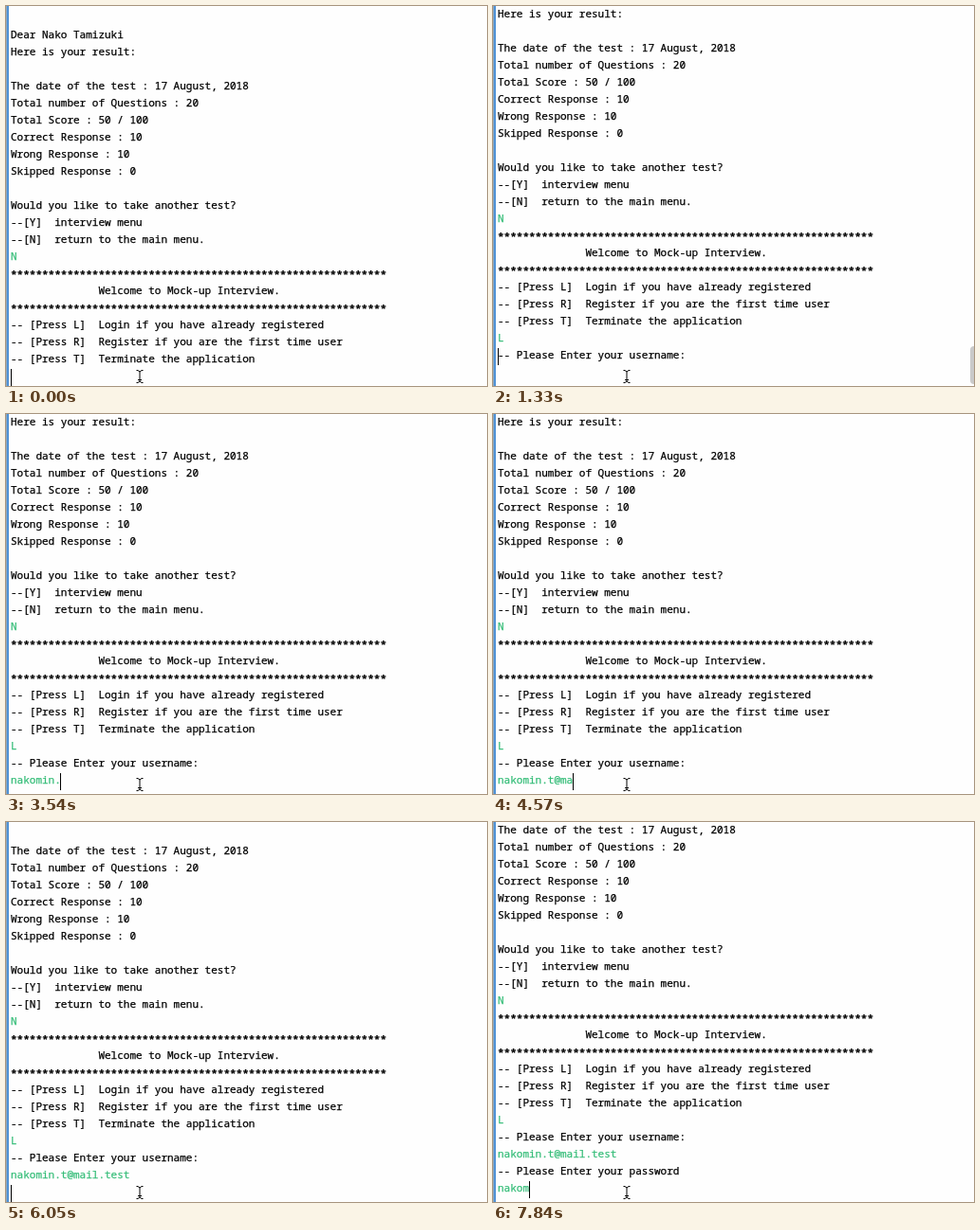
Animation, 507 px wide and 401 px high, one loop 8000 ms. Source, as an HTML page:

```html
<!DOCTYPE html>
<html lang="en">
<head>
<meta charset="utf-8">
<title>Console session</title>
<style>
  html, body { margin: 0; width: 100%; height: 100%; overflow: hidden; background: #fefefe; }
  #stage { position: relative; width: 507px; height: 401px; overflow: hidden; }
  #stage *:not(path) { position: absolute; }
  #view { left: 5px; top: 2px; width: 502px; height: 399px; overflow: hidden; }
  #console { left: 0; width: 502px; color: #000; -webkit-text-stroke: .25px;
    font: 11px/18px "Noto Sans Mono", "DejaVu Sans Mono", monospace; }
  #console div { left: 0; height: 18px; white-space: pre; }
  #console .input { color: #35bd78; }
  #console .stars { margin-top: 1px; font-weight: 700; }
  #console #caret { width: 1px; background: #000; }
  #edge { left: 0; top: 0; width: 3px; height: 401px;
    background: linear-gradient(90deg, #8fa9be 1px, #4f92d6 1px); }
  #thumb { left: 503px; top: 359px; width: 8px; height: 40px; border-radius: 4px; background: #cacaca; }
  #pointer { left: 133.5px; top: 380px; }
</style>
</head>
<body>
<div id="stage">
  <div id="view"><div id="console"><div id="caret"></div></div></div>
  <div id="edge"></div>
  <div id="thumb"></div>
  <svg id="pointer" width="14" height="22" fill="none" stroke="#000">
    <path d="M3.5 4.5h1.5l2 1.5l2-1.5h1.5M7 6v10M5 14.5h4M3.5 17.5h1.5l2-1.5l2 1.5h1.5"/>
  </svg>
</div>
<script>
const LOOP = 8000, ROW = 18, ADVANCE = 6.6;
const KEY = 148;     // time between keys, and from Enter to the next prompt
const BLINK = 590;   // the caret stays on this long after the last activity

const stars = '*'.repeat(60);
const output = [
  'Dear Nako Tamizuki',
  'Here is your result:',
  '',
  'The date of the test : 17 August, 2018',
  'Total number of Questions : 20',
  'Total Score : 50 / 100',
  'Correct Response : 10',
  'Wrong Response : 10',
  'Skipped Response : 0',
  '',
  'Would you like to take another test?',
  '--[Y]  interview menu',
  '--[N]  return to the main menu.',
  'N',
  stars,
  ' '.repeat(14) + 'Welcome to Mock-up Interview.',
  stars,
  '-- [Press L]  Login if you have already registered',
  '-- [Press R]  Register if you are the first time user',
  '-- [Press T]  Terminate the application'
];

// Each burst is [time of its first key, number of keys]
const turns = [
  { start: 0, answer: 'L', bursts: [[1040, 1]] },
  { start: 1180, prompt: '-- Please Enter your username:', answer: 'nakomin.t@mail.test',
    bursts: [[2360, 7], [3540, 1], [3830, 2], [4420, 9]] },
  { start: 6050, prompt: '-- Please Enter your password', answer: 'nakomin',
    bursts: [[7090, 3], [7690, 2]] }
];
for (const turn of turns) {
  turn.keys = turn.bursts.flatMap(([from, count]) =>
    Array.from({ length: count }, (_, i) => from + i * KEY));
}

const byId = id => document.getElementById(id);
const panel = byId('console'), caret = byId('caret'), thumb = byId('thumb');

function addRow(text, className = '') {
  const row = document.createElement('div');
  row.textContent = text;
  row.className = className;
  row.style.top = (panel.children.length - 1) * ROW + 'px';
  return panel.appendChild(row);
}

for (const text of output) {
  addRow(text, text === stars ? 'stars' : text === 'N' ? 'input' : '');
}
for (const turn of turns) {
  if (turn.prompt) turn.promptRow = addRow('');
  turn.answerRow = addRow('', 'input');
}

function render(t) {
  for (const turn of turns) {
    turn.typed = turn.keys.filter(key => key <= t).length;
    turn.answerRow.textContent = turn.answer.slice(0, turn.typed);
    if (turn.prompt) turn.promptRow.textContent = t >= turn.start + KEY ? turn.prompt : '';
  }

  const index = turns.findLastIndex(turn => turn.start <= t);
  const { start, prompt, answer, keys, typed } = turns[index];
  const fresh = prompt ? t < start + KEY : !typed;   // the new line is still empty
  const answerRow = output.length + 2 * index;
  const lastRow = prompt && fresh ? answerRow - 1 : answerRow;
  panel.style.top = (fresh ? 379 : 375) - lastRow * ROW + 'px';

  const caretRow = prompt && !typed ? answerRow - 1 : answerRow;
  const lastActivity = typed ? keys[typed - 1] : start;
  caret.style.left = Math.floor(typed * ADVANCE) + 'px';
  caret.style.top = caretRow * ROW + 2 + 'px';
  caret.style.opacity = typed < answer.length && t - lastActivity < BLINK ? 1 : 0;

  // The scroll thumb fades out as typing begins
  thumb.style.opacity = prompt && !fresh ? Math.max(0, 1 - typed / 2) : 0;
}

const begin = performance.now();
function frame() {
  render((performance.now() - begin) % LOOP);
  requestAnimationFrame(frame);
}
frame();
</script>
</body>
</html>
```
